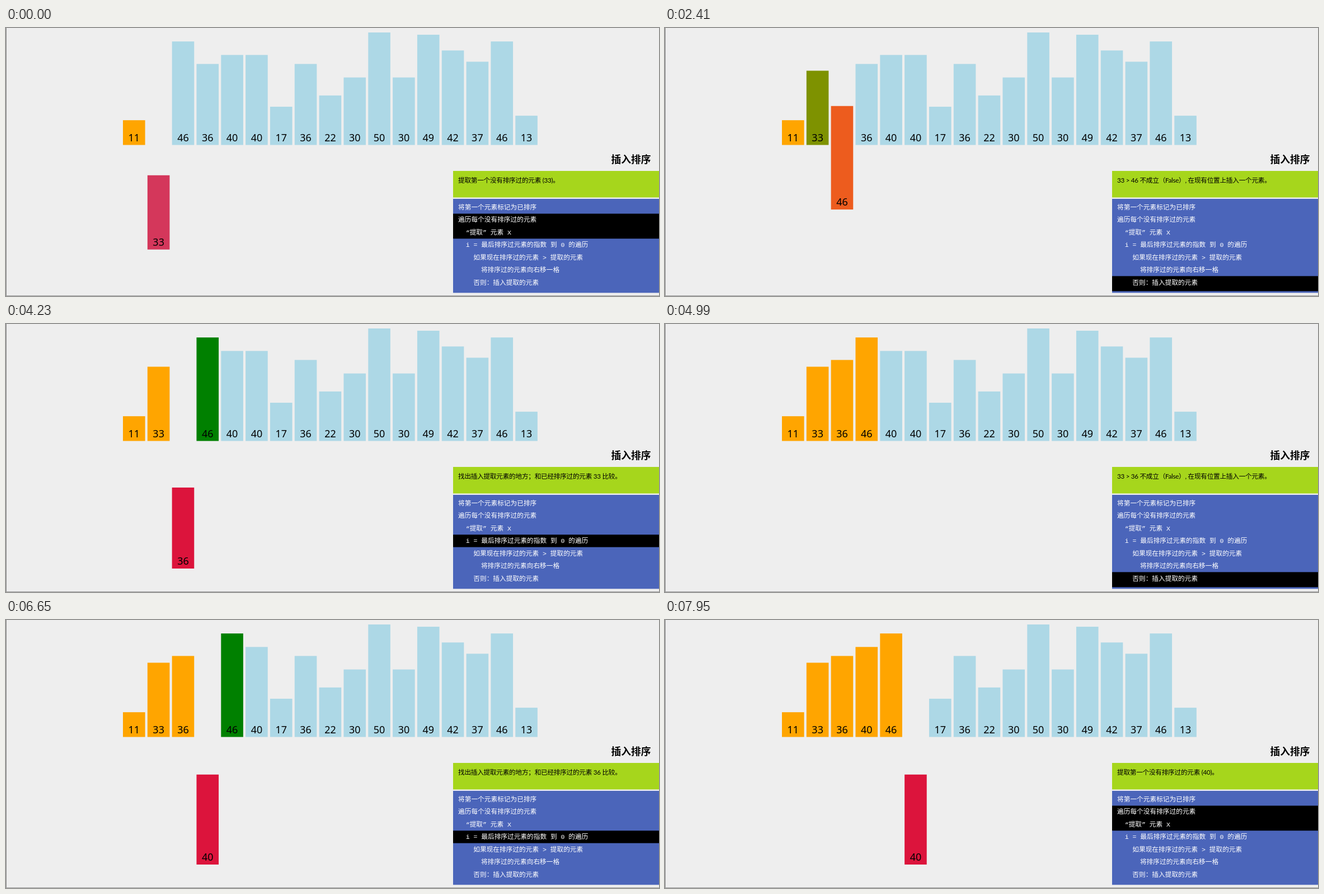
Animation, 1167 px wide and 480 px high, one loop 8 s. Source, as an HTML page:

```html
<!DOCTYPE html>
<html lang="zh-CN">
<head>
<meta charset="utf-8">
<title>插入排序</title>
<style>
html, body { margin: 0; width: 100%; height: 100%; overflow: hidden; background: #eee; }
svg { display: block; width: 1167px; height: 480px; }
text { white-space: pre; text-spacing-trim: space-all; }
.num { font: 18px "Noto Sans", "Open Sans", sans-serif; text-anchor: middle; }
.title { font: bold 17.75px "Noto Sans CJK SC", "Noto Sans CJK", sans-serif; text-anchor: end; }
.note { font: 11.7px Lato, "Noto Sans CJK SC", "Noto Sans CJK", sans-serif; letter-spacing: -.3px; }
.code { font: 11.7px "Liberation Mono", "Noto Sans CJK SC", "Noto Sans CJK", monospace; word-spacing: -.2px; fill: #fff; }
</style>
</head>
<body>
<svg id="stage" viewBox="0 0 1167 480"></svg>
<script>
const LOOP = 8000, DURATION = 250;
const PITCH = 43.83, BAR_W = 39.6, LEFT = 209, BASE = 209.5, UNIT = 4.03, DROP = 228.5;
const ROW_TOP = 310.2, ROW_H = 22.36;
const BLUE = [173, 216, 230], RED = [220, 20, 60], GREEN = [0, 128, 0], ORANGE = [255, 165, 0];
const VALUES = [11, 33, 46, 36, 40, 40, 17, 36, 22, 30, 50, 30, 49, 42, 37, 46, 13];
const CODE = [
  '将第一个元素标记为已排序',
  '遍历每个没有排序过的元素',
  '  “提取” 元素 X',
  '  i = 最后排序过元素的指数 到 0 的遍历',
  '    如果现在排序过的元素 > 提取的元素',
  '      将排序过的元素向右移一格',
  '    否则\uff1a插入提取的元素'
];

// Steps begin about every 490 ms, each a little sooner than the one before
const startOf = k => -160 + 491.3 * k - .4 * k * k;

// Runs the sort and records the pose of every bar after each step
function buildSteps() {
  const bars = VALUES.map((v, i) => ({ slot: i, drop: 0, color: i ? BLUE : ORANGE }));
  const order = bars.map((_, i) => i);
  const steps = [];
  const record = (note, first, last) =>
    steps.push({ note, first, last, bars: bars.map(b => ({ ...b })) });
  record('', 0, 0);
  for (let i = 1; startOf(steps.length - 1) < LOOP; i++) {
    const x = VALUES[order[i]], picked = bars[order[i]];
    picked.drop = 1;
    picked.color = RED;
    record(`提取第一个没有排序过的元素 (${x})。`, 1, 2);
    for (let j = i - 1; j >= 0; j--) {
      const other = bars[order[j]], v = VALUES[order[j]];
      for (const b of bars) if (b.color === GREEN) b.color = ORANGE;
      other.color = GREEN;
      record(`找出插入提取元素的地方\uff1b和已经排序过的元素 ${v} 比较。`, 3, 3);
      if (v <= x) {
        picked.drop = 0;
        picked.color = other.color = ORANGE;
        record(`${v} > ${x} 不成立\uff08False\uff09, 在现有位置上插入一个元素。`, 6, 6);
        break;
      }
      [order[j], order[j + 1]] = [order[j + 1], order[j]];
      picked.slot = j;
      other.slot = j + 1;
      record(`${v} > ${x} 成立\uff08True\uff09, 将现在排序过的元素 (${v}) 向右移一格。`, 4, 5);
    }
  }
  return steps;
}

const stage = document.getElementById('stage');
function add(tag, attrs, text = '', parent = stage) {
  const el = document.createElementNS('http://www.w3.org/2000/svg', tag);
  for (const k in attrs) el.setAttribute(k, attrs[k]);
  el.textContent = text;
  return parent.appendChild(el);
}
const rect = (x, y, width, height, fill, parent) =>
  add('rect', { x, y, width, height, fill }, '', parent);

rect(0, 0, 1167, 480, '#eee');
rect(0, 0, 1, 480, '#888');
rect(0, 479, 1167, 1, '#999');
const bars = VALUES.map(v => {
  const g = add('g', {});
  const box = rect(0, BASE - v * UNIT, BAR_W, v * UNIT, '', g);
  add('text', { class: 'num', x: BAR_W / 2, y: 202.5 }, v, g);
  return { g, box };
});
add('text', { class: 'title', x: 1152.5, y: 242 }, '插入排序');
rect(799, 256, 368, 47.5, '#a6d61c');
const note = add('text', { class: 'note', x: 808, y: 276.8 });
rect(799, 306, 368, 168.3, '#4b65ba');
const mark = rect(799, 0, 368, 0, '#000');
CODE.forEach((s, i) => add('text', { class: 'code', x: 808, y: 325 + i * 22.42 }, s));

const steps = buildSteps();
const ease = t => t < .5 ? 4 * t ** 3 : 1 - (2 - 2 * t) ** 3 / 2;
const mix = (a, b, p) => a + (b - a) * p;

function draw(t) {
  let n = 0;
  while (startOf(n + 1) <= t) n++;
  const from = steps[n], to = steps[n + 1];
  const p = ease(Math.min(1, (t - startOf(n)) / DURATION));
  bars.forEach(({ g, box }, i) => {
    const a = from.bars[i], b = to.bars[i];
    const x = LEFT + PITCH * mix(a.slot, b.slot, p);
    g.setAttribute('transform', `translate(${x} ${DROP * mix(a.drop, b.drop, p)})`);
    box.setAttribute('fill', `rgb(${a.color.map((c, k) => Math.round(mix(c, b.color[k], p)))})`);
  });
  if (note.textContent !== to.note) note.textContent = to.note;
  mark.setAttribute('y', ROW_TOP + to.first * ROW_H);
  mark.setAttribute('height', to.last === 6 ? 27 : (to.last - to.first + 1) * ROW_H);
}

const origin = performance.now();
function tick() {
  draw(Math.max(0, performance.now() - origin) % LOOP);
  requestAnimationFrame(tick);
}
tick();
</script>
</body>
</html>
```
